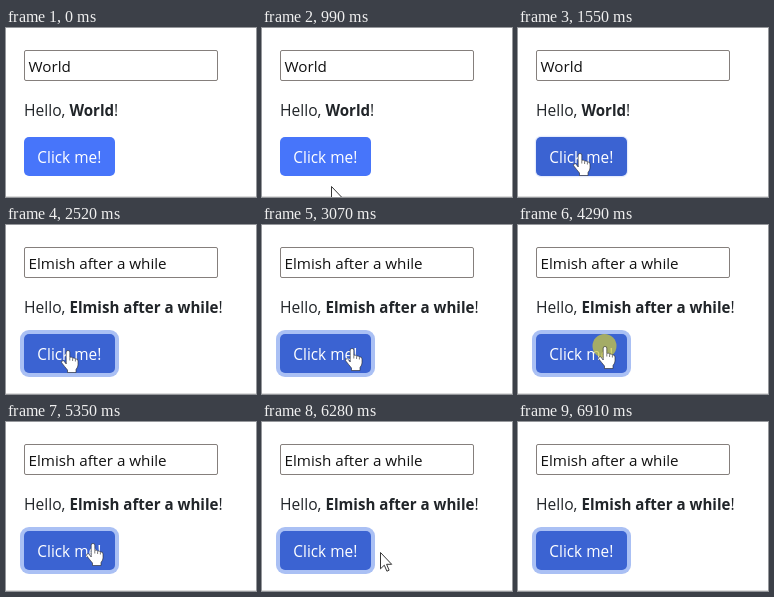
An HTML page with a canvas for the animation above (7.46 s loop, 250 px wide and 169 px high).

```html
<!DOCTYPE html>
<html lang="en">
<head>
<meta charset="utf-8">
<title>Click me</title>
<style>
html, body { margin: 0; height: 100%; overflow: hidden; background: #fff; }
canvas { display: block; }
</style>
</head>
<body>
<canvas id="stage" width="250" height="169"></canvas>
<script>
const LOOP = 7460;
const ctx = document.getElementById('stage').getContext('2d');

// Cursor moves: start, end, number of steps, from, to
const moves = [
  [780, 1450, 9, [72, 172], [62, 125]],
  [3000, 3340, 6, [62, 125], [156, 118]],
  [3690, 4010, 6, [156, 118], [87, 121]],
  [6140, 6840, 11, [87, 121], [221, 162]]
];
const arrow = new Path2D('M.5.5V16.8L4.3 13.2 6.9 19.2 9.1 18.2 6.6 12.3H11.7Z');
const hand = new Path2D('M5.2 14V2Q5.2.5 7 .5T8.8 2V7.3Q11.2 6.6 11.6 8.1Q13.8 7.4 14.4 9Q17 8.4 17 11V15Q17 17 15 19.5V22.5H6.5V20Q4 17 .6 12.7Q.1 10.2 2.5 10.8Q4 12 5.2 14Z');
const knuckles = new Path2D('M8.8 7.5V10.5M11.6 8.3V11M14.4 9.2V11.5');

const clamp = v => Math.max(0, Math.min(1, v));
const mix = (a, b, p) => a.map((v, i) => v + (b[i] - v) * p);
const rgb = c => `rgb(${c.map(Math.round)})`;
const ease = u => (u + u * u * (3 - 2 * u)) / 2;

function cursorAt(t) {
  if (t < 780 || t >= 6910) return null;
  const [start, end, steps, from, to] = moves.filter(m => t >= m[0]).pop();
  const step = Math.floor((t - start) / (end - start) * (steps - 1) + 1e-6) + 1;
  return mix(from, to, ease(clamp(step / steps))).map(Math.round);
}

function text(str, x, y, size, color, weight = 400) {
  ctx.font = `${weight} ${size}px "Open Sans", "Noto Sans", sans-serif`;
  ctx.fillStyle = color;
  ctx.fillText(str, x, y);
  return x + ctx.measureText(str).width;
}

function box(x, y, w, h, r, color) {
  ctx.fillStyle = color;
  ctx.beginPath();
  ctx.roundRect(x, y, w, h, r);
  ctx.fill();
}

function nameAt(t) {
  if (t < 1670) return 'World';
  const waiting = t < 2520 || (t >= 4430 && t < 5350);
  return waiting ? 'Elmish' : 'Elmish after a while';
}

function drawButton(t) {
  // The focus ring grows and gains colour together
  const focus = t < 1550 ? 0 : clamp((t - 1500) / 170);
  const ring = 4 * focus;
  if (ring) {
    box(18 - ring, 109 - ring, 91 + 2 * ring, 39 + 2 * ring, 5 + ring,
      rgb(mix([255, 255, 255], [170, 192, 244], focus)));
  }
  const fill = mix([71, 117, 250], [59, 99, 210], clamp((t - 1110) / 150));
  box(18, 109, 91, 39, 5, rgb(fill));
  text('Click me!', 31.3, 135, 15.4, '#fff', 500);
}

function drawClick(t, [x, y]) {
  const alpha = t >= 1600 && t < 1670 || t >= 4290 && t < 4430 ? 0.75
    : t >= 4430 && t < 4490 ? 0.35 : 0;
  if (!alpha) return;
  ctx.fillStyle = `rgba(200, 196, 65, ${alpha})`;
  ctx.beginPath();
  ctx.arc(x - 0.5, y, 12, 0, 7);
  ctx.fill();
}

function drawCursor([x, y]) {
  const over = x >= 18 && x < 109 && y >= 109 && y < 148;
  const shape = over ? hand : arrow;
  ctx.save();
  ctx.translate(over ? x - 7 : x, y);
  ctx.fillStyle = '#fff';
  ctx.strokeStyle = '#222';
  ctx.lineWidth = over ? 0.6 : 0.9;
  ctx.fill(shape);
  ctx.stroke(shape);
  if (over) ctx.stroke(knuckles);
  ctx.restore();
}

function draw(t) {
  ctx.fillStyle = '#fff';
  ctx.fillRect(0, 0, 250, 169);
  ctx.fillStyle = '#dcdcdc';
  ctx.fillRect(0, 168, 250, 1);

  ctx.strokeStyle = '#857f7c';
  ctx.lineWidth = 1;
  ctx.beginPath();
  ctx.roundRect(18.5, 22.5, 193, 30, 1.5);
  ctx.stroke();

  const name = nameAt(t);
  text(name, 22.5, 44, 15.2, '#111');
  let x = text('Hello, ', 18, 88, 15.6, '#212529');
  x = text(name, x, 88, 15.1, '#212529', 700);
  text('!', x, 88, 15.6, '#212529');

  drawButton(t);
  const cursor = cursorAt(t);
  if (cursor) {
    drawClick(t, cursor);
    drawCursor(cursor);
  }
}

const began = performance.now();
function tick() {
  draw((performance.now() - began) % LOOP);
  requestAnimationFrame(tick);
}
tick();
</script>
</body>
</html>
```
